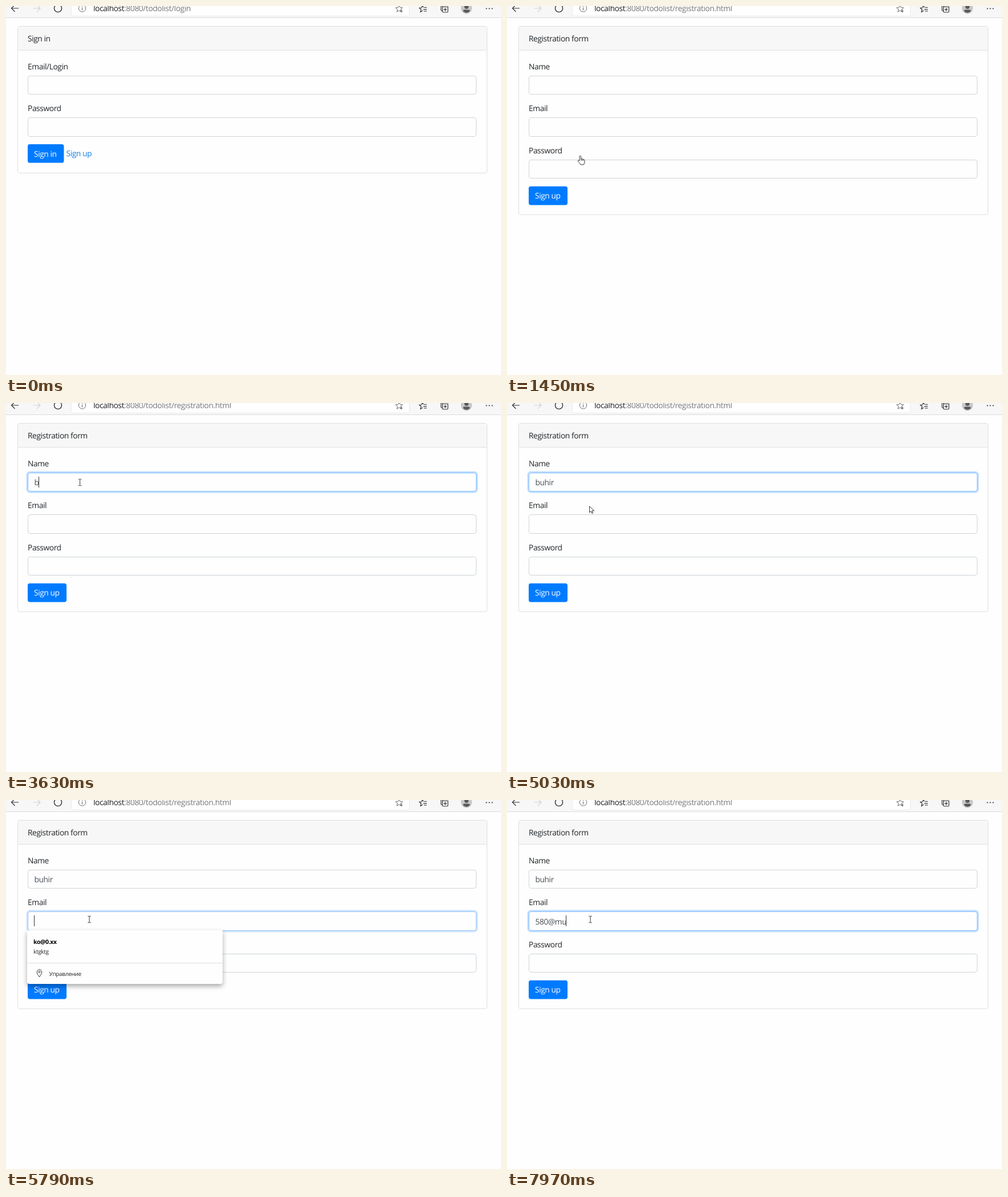
These frames come from a looping animation (867 by 646 pixels, 8 s). An HTML page:

```html
<!DOCTYPE html>
<html lang="en">
<head>
<meta charset="utf-8">
<title>Registration form</title>
<style>
  html, body { margin: 0; width: 100%; height: 100%; overflow: hidden; background: #fefefe; }
  svg { display: block; }
  text {
    font: 13.8px "Open Sans", "Noto Sans", sans-serif;
    letter-spacing: -0.031em;
    text-rendering: geometricPrecision;
    fill: #212529;
    white-space: pre;
  }
  .value { fill: #495057; }
  .button { fill: #fff; }
  .small { font-size: 10px; }
  .bold { font-size: 10.4px; font-weight: 700; fill: #000; }
  .popup { filter: drop-shadow(0 4px 4px rgba(0, 0, 0, .34)); }
  .line { fill: none; stroke: #333; stroke-width: 1.2; }
</style>
</head>
<body>
<svg id="stage" width="867" height="646" viewBox="0 0 867 646"></svg>
<script>
const LOOP = 8000, STEP = 77.5, FIRST = 220;
const stage = document.getElementById('stage');
const NAME = 'buhir', EMAIL = '580@mu';
const PERSON = 'ktgktg', ADDRESS = 'ko@0.xx';
const nameKeys = [3560, 3710, 3860, 4100, 4250];
const emailKeys = [6100, 6250, 6480, 7110, 7810, 7970];

const between = (t, a, b) => t >= a && t < b;
const clamp = v => Math.max(0, Math.min(1, v));
const text = (x, y, s, cls = '', extra = '') =>
  `<text x="${x}" y="${y}" class="${cls}" ${extra}>${s}</text>`;
const box = (x, y, w, h, fill, stroke = 'none', r = 0, extra = '') =>
  `<rect x="${x}" y="${y}" width="${w}" height="${h}" rx="${r}" fill="${fill}" stroke="${stroke}" ${extra}/>`;
const path = (d, extra = '') => `<path class="line" d="${d}" ${extra}/>`;
const group = (id, body, cls = '') => `<g id="${id}" class="${cls}">${body}</g>`;

function star(cx, cy, r) {
  let d = '';
  for (let i = 0; i < 10; i++) {
    const a = -Math.PI / 2 + i * Math.PI / 5, q = i % 2 ? r * .45 : r;
    d += (i ? 'L' : 'M') + (cx + q * Math.cos(a)).toFixed(2) + ' ' + (cy + q * Math.sin(a)).toFixed(2);
  }
  return d + 'Z';
}

function toolbar() {
  return box(0, 0, 867, 20, '#f7f7f7') + box(0, 20, 867, 1, '#dcdcdc') +
    box(114.5, -10.5, 592, 28, '#fff', '#ebebeb', 3) +
    path('M22 4H9.5M15.5 -2L9.5 4L15.5 10') +
    path('M47.5 4H60M54 -2L60 4L54 10', 'style="stroke:#d2d2d2"') +
    '<circle class="line" cx="91" cy="4" r="6.6" style="stroke-width:1.4"/>' +
    '<circle class="line" cx="133.5" cy="4" r="6.2" style="stroke:#707070;stroke-width:1"/>' +
    path('M133.5 3V7.5M133.5 .5V1.8', 'style="stroke:#707070"') +
    path(star(688.5, 5, 6.5), 'style="stroke:#666;stroke-width:1"') +
    path('M692.5 6.5V11.5M690 9H695', 'style="stroke:#666;stroke-width:1"') +
    path('M731 2.5L729.5 -1L727.8 3L724 3.5L727 6L726 10.5L730 8M732 2.5H737M731 5.8H737M732 9H737') +
    path('M765 8.5H763.5Q762 8.5 762 7V-1M764.5 -1V9.5Q764.5 11 766 11H772.5Q774 11 774 9.5V1.5H764.5M769.3 3.5V9M766.5 6.2H772') +
    '<circle cx="806.5" cy="4" r="9.7" fill="#c8c8c8"/>' +
    '<circle cx="806.5" cy="1.5" r="3.6" fill="#595959"/>' +
    '<path d="M800.5 9Q800.5 6.5 803 6.5H810Q812.5 6.5 812.5 9Q810 12 806.5 12T800.5 9Z" fill="#595959"/>' +
    [841.5, 846.5, 851.5].map(x => `<circle cx="${x}" cy="4.5" r="1.1" fill="#333"/>`).join('') +
    '<text x="153" y="9" style="fill:#767676"><tspan fill="#1c1c1c">localhost</tspan>:8080/todolist/<tspan id="file"></tspan></text>';
}

const card = (title, bottom) =>
  box(20.5, 35.5, 822, bottom - 35.5, '#fefefe', '#dfdfdf', 3.5) +
  box(21, 36, 821, 41, '#f7f7f7', 'none', 3) + box(21, 77, 821, 1, '#dfdfdf') +
  text(38, 62, title);

const field = (id, label, y, h = 32) =>
  text(38, y - 11.5, label) +
  box(37, y - 1.5, 788, h + 3, 'none', '#007bff', 5, `id="${id}Ring" stroke-width="3" opacity="0"`) +
  box(38.5, y, 785, h, '#fefefe', '#ced4da', 3.7, `id="${id}Box"`) +
  text(49.5, y + 21.5 + (h - 32) / 2, '', 'value', `id="${id}"`);

const button = (label, y, w) => box(38, y, w, 32.6, '#007bff', 'none', 3.7) + text(49, y + 21.6, label, 'button');

function popup(id, top, bottom, head, sub, rows) {
  const body = `<path d="M37 ${top}H379.5V${bottom - 4}q0 4 -4 4H41q-4 0 -4 -4Z" fill="#fefefe"/>` +
    text(48, top + 23.5, head, 'bold') + text(48, top + 40.5, sub, 'small') +
    rows.map((s, i) => text(48, top + 73.3 + 32.4 * i, s, 'bold')).join('') +
    box(37, bottom - 37, 342.5, 1, '#dedede') +
    path(`M58.5 ${bottom - 12}C56 ${bottom - 16} 54.3 ${bottom - 18} 54.3 ${bottom - 21}a4.2 4.2 0 0 1 8.4 0C62.7 ${bottom - 18} 61 ${bottom - 16} 58.5 ${bottom - 12}Z`, 'style="stroke-width:1"') +
    `<circle class="line" cx="58.5" cy="${bottom - 21}" r="1.5" style="stroke-width:1"/>` +
    text(75.5, bottom - 14, 'Управление', 'small');
  return group(id, body, 'popup');
}

stage.innerHTML =
  box(0, 0, 867, 646, '#fefefe') + toolbar() +
  group('login', card('Sign in', 292.5) +
    field('login1', 'Email/Login', 122.5) + field('login2', 'Password', 195.5, 33) +
    button('Sign in', 242, 63.4) + text(105.5, 262.5, 'Sign up', '', 'id="link"')) +
  group('register', card('Registration form', 365.5) +
    field('name', 'Name', 122.5) + field('email', 'Email', 195.5, 33) + field('pass', 'Password', 269.5) +
    button('Sign up', 315.8, 68)) +
  box(49, 129, 1, 19, '#333', 'none', 0, 'id="caret"') +
  popup('namePopup', 154, 378, PERSON, ADDRESS, ['ozpozp', 'ezpezp', 'xurxur', 'ux']) +
  popup('emailPopup', 228, 322, ADDRESS, PERSON, []) +
  '<circle id="click" r="10.2" fill="#fff200" fill-opacity=".68"/>' +
  group('pointer',
    group('arrow', '<path d="M.5 .3V11.2L3 8.9L4.9 12.9L6.7 12.1L4.9 8.2H8.6Z" fill="#fff" stroke="#222" stroke-width=".9"/>') +
    group('beam', path('M-2.6 -5.8Q0 -6 0 -4.5V4.5Q0 6 2.6 5.8M2.6 -5.8Q0 -6 0 -4.5M0 4.5Q0 6 -2.6 5.8', 'style="stroke-width:1"')) +
    group('hand', '<path d="M-1.5 9V1.5Q-1.5 .3 -.2 .3T1.2 1.5V6L3 5.7L5 6.3L6.7 7Q7.5 7.5 7.5 9V11.5L6 15.8H.5L-1.6 12.5L-4.2 9.6Q-4.3 8 -2.8 8.2Z" fill="#fff" stroke="#222" stroke-width=".9"/><path d="M1.2 6V9M3.3 6V9M5.3 6.5V9" stroke="#222" stroke-width=".8"/>'));

const $ = {};
stage.querySelectorAll('[id]').forEach(e => $[e.id] = e);
const show = (id, on) => $[id].style.display = on ? '' : 'none';

// time, x, y of the pointer's hot spot
const route = [
  [220, 768, 617], [450, 610, 520], [680, 340, 375], [840, 175, 290], [990, 128.5, 262],
  [1840, 128.5, 262], [1920, 128.5, 250], [2080, 128, 198], [2230, 129.3, 147], [2305, 129.5, 139],
  [4790, 129.5, 139], [4870, 131, 147], [5025, 144, 180.5], [5100, 146, 192], [5180, 146, 197],
  [5410, 146, 197], [5560, 146, 209], [LOOP, 146, 209]
];

function pointerAt(t) {
  const i = Math.max(1, route.findIndex(p => p[0] >= t));
  const [a, x, y] = route[i - 1], [b, u, v] = route[i];
  const k = clamp((t - a) / (b - a));
  return [x + (u - x) * k, y + (v - y) * k];
}

const typed = (word, keys, t) => word.slice(0, keys.filter(k => t >= k).length);

function focusField(id, level) {
  $[id + 'Ring'].setAttribute('opacity', level * .25);
  const mix = (a, b) => Math.round(a + (b - a) * level);
  $[id + 'Box'].setAttribute('stroke', `rgb(${mix(206, 128)},${mix(212, 189)},${mix(218, 255)})`);
}

function draw(t) {
  const s = t < FIRST ? 0 : FIRST + Math.floor((t - FIRST) / STEP + .05) * STEP;
  const onLogin = t < 1450;
  const [x, y] = pointerAt(s);

  show('login', onLogin);
  show('register', !onLogin);
  $.file.textContent = onLogin ? 'login' : 'registration.html';

  const hover = x > 105 && x < 153 && y > 248 && y < 268;
  $.link.style.fill = hover ? '#0056b3' : '#1780e6';
  $.link.style.textDecoration = hover ? 'underline' : 'none';

  const inField = !onLogin && (between(y, 122, 155) || between(y, 192, 229));
  const kind = hover && t < 1915 ? 'hand' : inField ? 'beam' : 'arrow';
  show('pointer', t >= FIRST);
  ['hand', 'beam', 'arrow'].forEach(k => show(k, k === kind));
  $.pointer.setAttribute('transform', `translate(${x.toFixed(2)} ${y.toFixed(2)})`);

  const clicking = [[1290, 1450], [2470, 2610], [5180, 5325], [5630, 5785]].some(c => between(t, ...c));
  show('click', clicking);
  $.click.setAttribute('cx', x - 1);
  $.click.setAttribute('cy', y);

  $.name.textContent = typed(NAME, nameKeys, t);
  $.email.textContent = typed(EMAIL, emailKeys, t);
  focusField('name', clamp((s - 2440) / 150) * clamp((5330 - s) / 150));
  focusField('email', clamp((s - 5610) / 150));
  show('namePopup', between(t, 2470, 3560));
  show('emailPopup', between(t, 5640, 6100));

  const lit = [[2470, 3010], [3560, 4790], [5640, 7030], [7110, 7660], [7810, LOOP]];
  const caretOn = lit.some(c => between(t, ...c));
  show('caret', caretOn);
  if (caretOn) {
    const el = t < 5000 ? $.name : $.email;
    const w = el.textContent ? el.getComputedTextLength() : 0;
    $.caret.setAttribute('x', Math.floor(49 + w));
    $.caret.setAttribute('y', el === $.name ? 129 : 202);
  }
}

const start = performance.now();
function tick() {
  draw((performance.now() - start + 2) % LOOP);
  requestAnimationFrame(tick);
}
tick();
</script>
</body>
</html>
```
